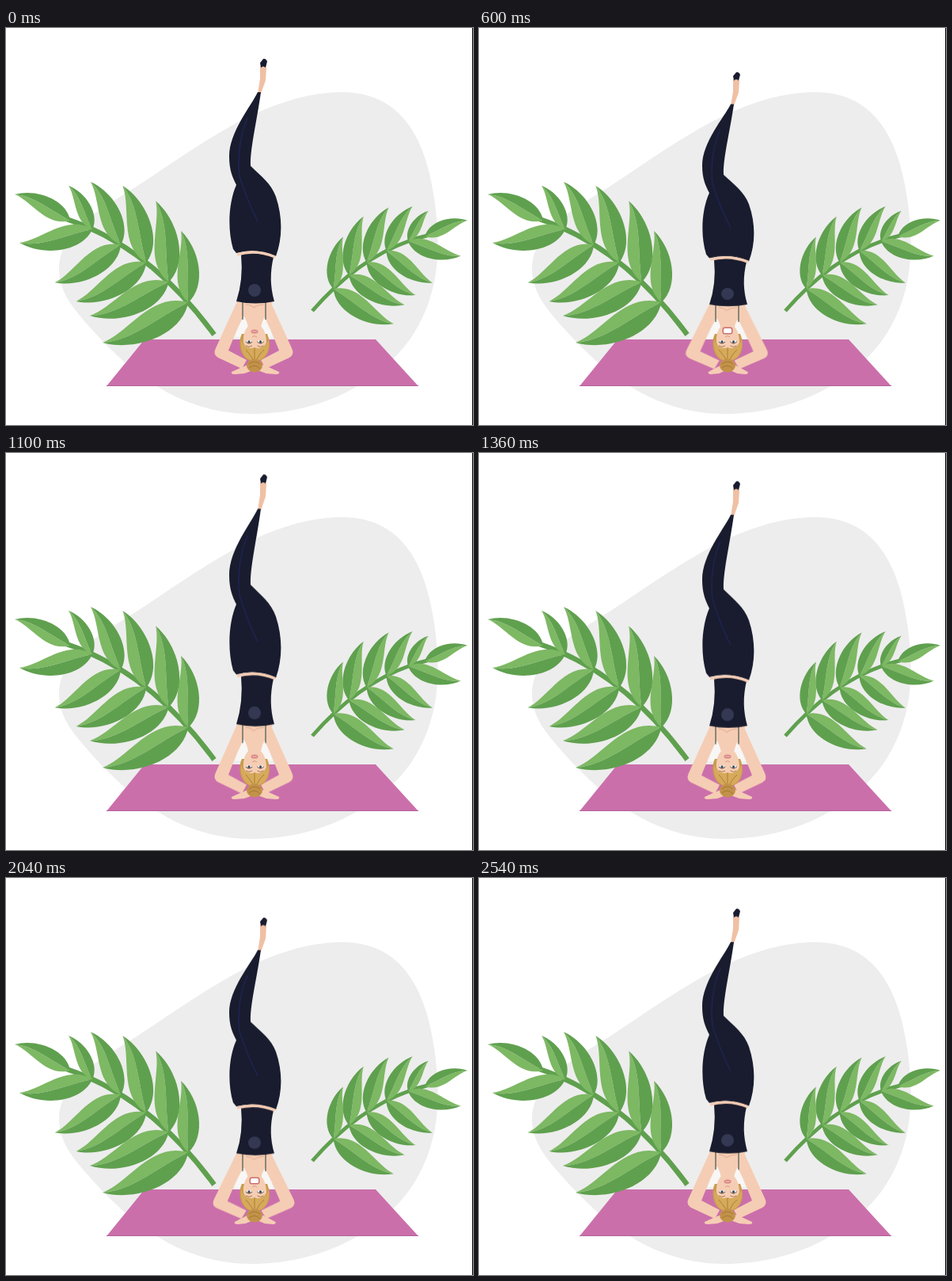
An HTML page for the animation above (2560 ms loop, 590x501 px).

```html
<!DOCTYPE html>
<html lang="en">
<head>
<meta charset="utf-8">
<title>Headstand press</title>
<style>
  html, body { margin: 0; width: 100%; height: 100%; overflow: hidden; background: #fff; }
  svg { display: block; width: 590px; height: 501px; }
  .body, .arms, .hands, .teeth {
    transform-origin: 313px 435px;
    animation: 640ms cubic-bezier(.37, 0, .63, 1) infinite alternate;
  }
  .body { animation-name: press; }
  .arms { animation-name: bend; }
  .hands { animation-name: slide; }
  .teeth { animation-name: strain; animation-timing-function: step-end; }
  @keyframes press {
    0% { transform: scaleY(1); }
    40.6% { transform: scaleY(1.038); }
    97%, 100% { transform: scaleY(.957); }
  }
  @keyframes bend {
    0% { transform: scale(1, 1); }
    40.6% { transform: scale(1, 1.038); }
    97%, 100% { transform: scale(1.05, .957); }
  }
  @keyframes slide {
    0%, 40.6% { transform: scaleX(1); }
    97%, 100% { transform: scaleX(.83); }
  }
  @keyframes strain {
    0% { opacity: 0; }
    60%, 100% { opacity: 1; }
  }
</style>
</head>
<body>
<svg viewBox="0 0 590 501">
  <path fill="#ededed" d="M425 81C500 81 530 140 541 215C550 278 548 335 513 389C472 449 396 487 310 487C225 487 165 440 120 393C85 355 66 335 67 300C70 255 120 228 165 200C245 148 330 81 425 81Z"/>
  <path fill="#cb6fab" d="M175 393H467L521 452H127Z"/>
  <path fill="none" stroke="#b3639a" d="M127 451.5H521"/>
  <g id="plant"></g>
  <use href="#plant" transform="translate(387 357) rotate(4.9) scale(-.736 .736) translate(-263 -387)"/>

  <g class="arms" fill="#f5cdb4">
    <path fill="#f8f7f6" d="M299 364L289 390H337L327 364Z"/>
    <path id="arm" d="M292 345L265 404Q261 412 268 416L298 430L304 419L281 407L292 380L301 362L303 345Z"/>
    <use href="#arm" transform="matrix(-1 0 0 1 626 0)"/>
  </g>
  <g class="hands" fill="#f5cdb4">
    <path id="hand" d="M308 424L296 429L285 434Q284 437 289 437L301 436L312 432Z"/>
    <use href="#hand" transform="matrix(-1 0 0 1 630 0)"/>
  </g>

  <g class="body">
    <path fill="#f5cdb4" d="M295 343H338L329 362Q323 368 321 384H307Q305 368 299 362Z"/>
    <path fill="none" stroke="#e3ae93" d="M303 349Q309 349 313 353Q318 349 326 349"/>
    <path fill="none" stroke="#6f7568" stroke-width="1.6" d="M299 345V368M328 345V368"/>
    <path fill="#f0c0a4" d="M318 83L321 64L321 49Q325 45 329 50L328 66L322 83Z"/>
    <path fill="#191c2e" d="M322 50L321 44L325 39Q328 38 330 42L328 50Q325 47 322 50Z"/>
    <path fill="#191c2e" d="M318 81C310 98 282 131 282 162C282 179 286 188 291 198C282 218 279 252 287 279L291 284Q316 277 341 288C349 266 350 240 341 213C335 196 322 187 309 174C308 154 317 117 322 81Z"/>
    <path fill="none" stroke="#20265a" stroke-opacity=".8" stroke-width="1.6" d="M305 114C296 134 292 162 295 187Q304 216 318 244"/>
    <path fill="#191c2e" d="M297 286Q317 281 338 289Q331 318 339 345Q315 350 291 345Q300 318 297 286Z"/>
    <path fill="none" stroke="#f5cdb4" stroke-width="3.5" d="M292 286Q316 279 340 289"/>
    <circle cx="314" cy="331" r="8" fill="#343852"/>
  </g>

  <g>
    <path fill="#c99b4b" d="M298 386C293 396 295 411 304 418Q314 424 324 418C334 411 335 398 330 386Z"/>
    <path fill="#f5cdb4" d="M314 373C304 373 299 385 300 397Q302 405 314 405T329 397C329 385 324 373 314 373Z"/>
    <path fill="#d6aa5b" d="M297 393Q302 408 314 403Q327 408 332 393Q334 413 320 419H308Q295 412 297 393Z"/>
    <path fill="none" stroke="#ad7e37" d="M303 406Q309 413 312 418M314 404V418M326 406Q320 411 317 418"/>
    <ellipse cx="314" cy="426" rx="10" ry="8.5" fill="#c2924a"/>
    <path fill="none" stroke="#a7782f" d="M307 424Q314 418 321 424M307 429Q314 423 321 430"/>
    <g id="eye">
      <ellipse cx="307" cy="396" rx="3.2" ry="2" fill="#fff"/>
      <circle cx="307" cy="396" r="1.7" fill="#3b5263"/>
      <path fill="none" stroke="#5b4033" d="M303 396Q307 400 311 396"/>
      <path fill="none" stroke="#a97942" d="M303 401Q307 404 311 401"/>
    </g>
    <use href="#eye" x="14.5"/>
    <path fill="none" stroke="#d99a83" d="M311 390Q314 387 317 390"/>
    <ellipse cx="314" cy="383" rx="4.5" ry="2.6" fill="#d98583"/>
    <path fill="none" stroke="#f3c5bd" d="M311 383H317"/>
    <g class="teeth">
      <rect x="307.5" y="377.5" width="13" height="9" rx="3" fill="#c9706c"/>
      <rect x="309" y="379" width="10" height="6" rx="1.5" fill="#fff"/>
    </g>
  </g>
  <path fill="#000" d="M589 0h1v501h-1z"/>
</svg>
<script>
  const LIGHT = '#7db863', DARK = '#5fa04e', PAIRS = 5;

  // The stem, and the curves on which the leaf tips lie above and below it.
  const stem = [[263, 387], [225, 335], [165, 270], [76, 241]];
  const upperTips = [[221, 256], [190, 191], [103, 188], [79, 199]];
  const lowerTips = [[122, 397], [98, 332], [92, 365], [17, 271]];

  function pointOn([a, b, c, d], t) {
    const u = 1 - t;
    return [0, 1].map(i =>
      u * u * u * a[i] + 3 * u * u * t * b[i] + 3 * u * t * t * c[i] + t * t * t * d[i]);
  }

  // A hooked leaf: a full dark belly on one side of the rib, a slim light half on the other.
  function leaf([bx, by], [tx, ty], side) {
    const dx = tx - bx, dy = ty - by;
    const at = (along, off) =>
      `${bx + dx * along - dy * off * side} ${by + dy * along + dx * off * side}`;
    const rib = `M${at(0, 0)}C${at(.35, 0)} ${at(.7, .12)} ${at(1, 0)}`;
    const half = (far, near, fill) =>
      `<path fill="${fill}" d="${rib}C${far} ${near} ${at(0, 0)}Z"/>`;
    return half(at(.7, .02), at(.3, -.27), LIGHT) + half(at(.72, .24), at(.2, .28), DARK);
  }

  let art = `<path fill="none" stroke="${DARK}" stroke-width="6.5" d="M${stem[0]}C${stem.slice(1)}"/>`;
  for (let i = 0; i < PAIRS; i++) {
    const base = pointOn(stem, .25 + .155 * i), t = i / (PAIRS - 1);
    art += leaf(base, pointOn(upperTips, t), 1) + leaf(base, pointOn(lowerTips, t), -1);
  }
  art += leaf(pointOn(stem, .98), [11, 210], 1);
  document.getElementById('plant').innerHTML = art;
</script>
</body>
</html>
```
